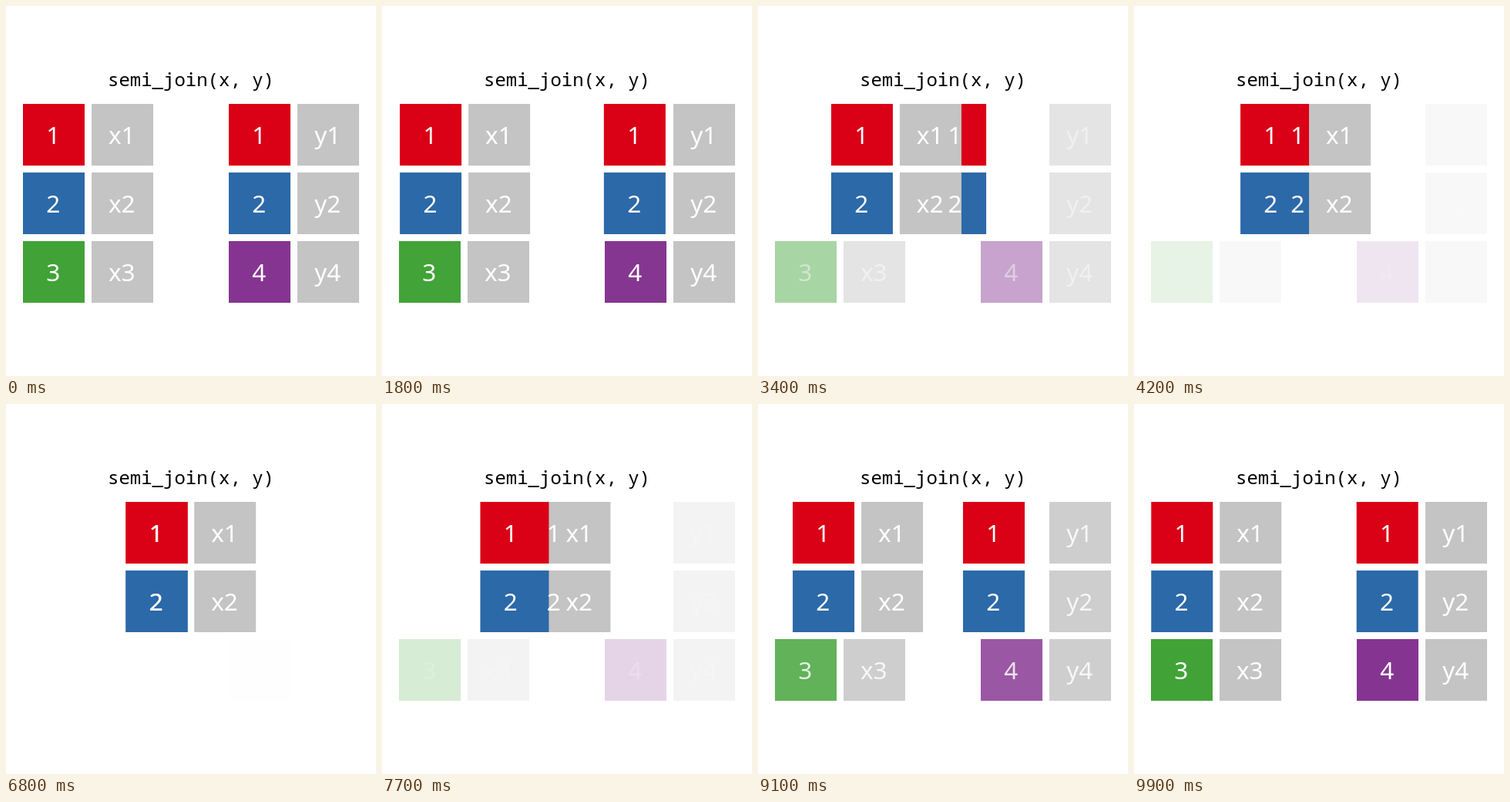
Recreate the animation shown at these times as an HTML page with a canvas. Size 480 by 480 pixels, loop 10 s.

```html
<!DOCTYPE html>
<html lang="en">
<head>
<meta charset="utf-8">
<title>semi_join</title>
<style>
  html, body { margin: 0; width: 100%; height: 100%; overflow: hidden; background: #fff; }
  canvas { display: block; }
</style>
</head>
<body>
<canvas id="stage" width="480" height="480"></canvas>
<script>
const ctx = document.getElementById('stage').getContext('2d');

const LOOP = 10000, STEP = 100;
const SIZE = 80, PITCH = 89, TOP = 127;
const LEFT_X = 22, LEFT_Y = 289, TRAVEL = 133.5;
const GREY = '#c4c4c4';
const COLORS = { 1: '#da0016', 2: '#2c69a8', 3: '#41a337', 4: '#853591' };

// Each row gives a key tile and a value tile; dir is the travel direction when joined.
function table(name, left, keys, dir) {
  return keys.flatMap((key, row) => {
    const joined = key < 3;
    const y = TOP + row * PITCH;
    return [
      { label: `${key}`, color: COLORS[key], x: left, y, dir, stays: joined },
      { label: name + key, color: GREY, x: left + PITCH, y, dir, stays: joined && name === 'x' }
    ];
  });
}

// The y table lies underneath the x table.
const tiles = [
  ...table('y', LEFT_Y, [1, 2, 4], -1),
  ...table('x', LEFT_X, [1, 2, 3], 1)
];

function ease(t, start, end) {
  const u = Math.min(1, Math.max(0, (t - start) / (end - start)));
  return (1 - Math.cos(Math.PI * u)) / 2;
}

function draw(t) {
  const p = ease(t, 1600, 5000) - ease(t, 6700, 10000);
  const left = tile => tile.x + (tile.stays ? tile.dir * TRAVEL * p : 0);
  const alpha = tile => tile.stays ? 1 : 1 - p;

  ctx.globalAlpha = 1;
  ctx.fillStyle = '#fff';
  ctx.fillRect(0, 0, 480, 480);

  ctx.textAlign = 'center';
  ctx.fillStyle = '#000';
  ctx.font = '24px "Noto Sans Mono", "DejaVu Sans Mono", monospace';
  ctx.fillText('semi_join(x, y)', 240, 104);

  for (const tile of tiles) {
    ctx.globalAlpha = alpha(tile);
    ctx.fillStyle = tile.color;
    ctx.fillRect(left(tile), tile.y, SIZE, SIZE);
  }

  ctx.fillStyle = '#fff';
  ctx.font = '31.5px "Noto Sans", "Open Sans", sans-serif';
  for (const tile of tiles) {
    ctx.globalAlpha = alpha(tile);
    ctx.fillText(tile.label, left(tile) + SIZE / 2 - 0.7, tile.y + 52);
  }
}

const begin = performance.now();
function frame() {
  const t = (performance.now() - begin) % LOOP;
  draw(Math.floor(t / STEP) * STEP);
  requestAnimationFrame(frame);
}
frame();
</script>
</body>
</html>
```
